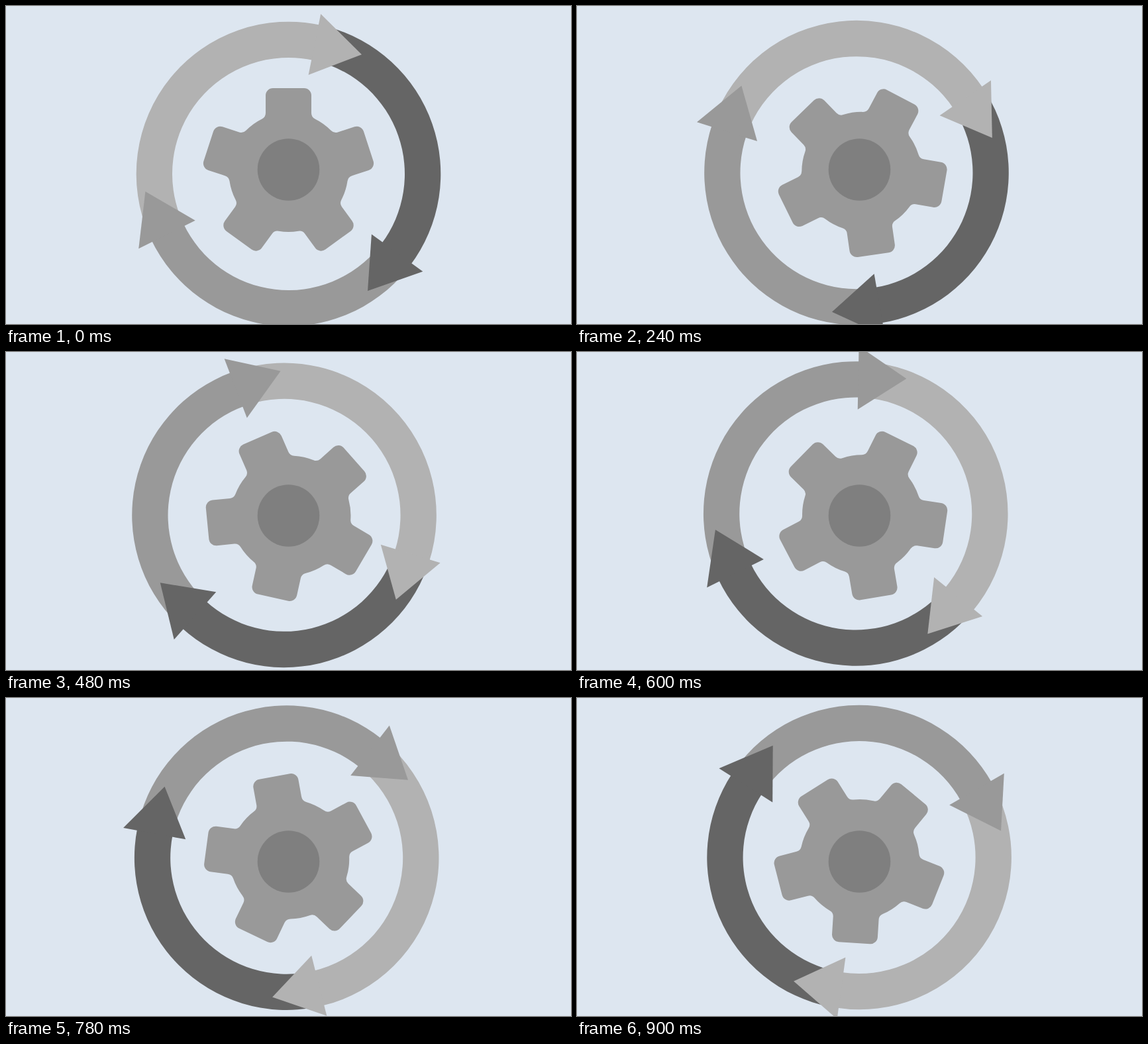
Recreate the animation shown at these times as an HTML page. Size 853 px wide and 480 px high, loop 0.96 s.

```html
<!DOCTYPE html>
<html lang="en">
<head>
<meta charset="utf-8">
<title>Gear and cycle arrows</title>
<style>
  html, body { margin: 0; width: 100%; height: 100%; overflow: hidden; background: #dde6f0; }
  svg { display: block; width: 100vw; height: 100vh; }
</style>
</head>
<body>
<svg viewBox="0 0 853 480">
  <g id="ring"></g>
  <g id="gear"><path fill="#999"/></g>
  <circle cx="426.5" cy="247" r="46.8" fill="#7f7f7f"/>
</svg>
<script>
const LOOP = 960, STEP = 60, TURN = 7.35;
const PIVOT = [426.5, 247];
const RING = { y: 6.5, inner: 175.5, outer: 229.8 };
const GEAR = { y: 4, teeth: 5, tip: 127, body: 90, half: 34.5, corner: 11, fillet: 10 };

// Angles in degrees, clockwise from the top; radii of the head's corners.
const ARROWS = [
  { color: '#b2b2b2', tip: 31.5, base: 11.4, tipR: 211.5, low: 152.4, high: 246.3 },
  { color: '#656565', tip: 145.9, base: 126, tipR: 213.2, low: 155, high: 250.7 },
  { color: '#999', tip: 263, base: 243.5, tipR: 217.7, low: 157.3, high: 252.8 }
];

const ring = document.getElementById('ring');
const gear = document.getElementById('gear');

const pt = (x, y) => x.toFixed(2) + ' ' + y.toFixed(2);

function polar(r, deg) {
  const a = deg * Math.PI / 180;
  return pt(r * Math.sin(a), -r * Math.cos(a));
}

function addPath(d, fill) {
  const p = document.createElementNS('http://www.w3.org/2000/svg', 'path');
  p.setAttribute('d', d);
  p.setAttribute('fill', fill);
  ring.append(p);
}

function shaft(from, to) {
  const { inner, outer } = RING;
  const large = to - from > 180 ? 1 : 0;
  return `M${polar(outer, from)}A${outer} ${outer} 0 ${large} 1 ${polar(outer, to)}` +
    `L${polar(inner, to)}A${inner} ${inner} 0 ${large} 0 ${polar(inner, from)}Z`;
}

function head(a) {
  return `M${polar(a.low, a.base)}L${polar(a.high, a.base)}L${polar(a.tipR, a.tip)}Z`;
}

function gearPath() {
  const { teeth, tip, body, half, corner, fillet } = GEAR;
  const fx = half + fillet;
  const fy = Math.sqrt((body + fillet) ** 2 - fx ** 2);
  const k = body / (body + fillet);
  const side = [[fx * k, fy * k], [half, fy], [half, tip - corner], [half - corner, tip]];
  let d = '';
  for (let i = 0; i < teeth; i++) {
    const a = i * 2 * Math.PI / teeth, c = Math.cos(a), s = Math.sin(a);
    const at = (n, sign) => {
      const x = sign * side[n][0], y = -side[n][1];
      return pt(x * c - y * s, x * s + y * c);
    };
    const arc = (r, sweep, end) => `A${r} ${r} 0 0 ${sweep} ${end}`;
    d += (i ? arc(body, 1, at(0, -1)) : 'M' + at(0, -1)) +
      arc(fillet, 0, at(1, -1)) + 'L' + at(2, -1) +
      arc(corner, 1, at(3, -1)) + 'L' + at(3, 1) +
      arc(corner, 1, at(2, 1)) + 'L' + at(1, 1) +
      arc(fillet, 0, at(0, 1));
  }
  return d + `A${body} ${body} 0 0 1 ${pt(-side[0][0], -side[0][1])}Z`;
}

// Each tail starts hidden under the head behind it.
ARROWS.forEach((a, i) => {
  const prev = ARROWS[(i + 2) % 3].tip - 17 - (i ? 0 : 360);
  addPath(shaft(prev, a.base + 1), a.color);
});
ARROWS.forEach(a => addPath(head(a), a.color));
gear.firstElementChild.setAttribute('d', gearPath());

function place(el, deg, y) {
  el.setAttribute('transform', `translate(${PIVOT}) rotate(${deg}) translate(0 ${y})`);
}

function draw(ms) {
  const k = Math.floor(ms % LOOP / STEP);
  // Steps alternate between two turns and one, with one extra turn halfway.
  const turns = Math.ceil(1.5 * k) + (k > 7 ? 1 : 0);
  place(ring, turns * TURN, RING.y);
  place(gear, -turns * TURN, GEAR.y);
}

const start = performance.now();
function tick() {
  draw(performance.now() - start);
  requestAnimationFrame(tick);
}
tick();
</script>
</body>
</html>
```
